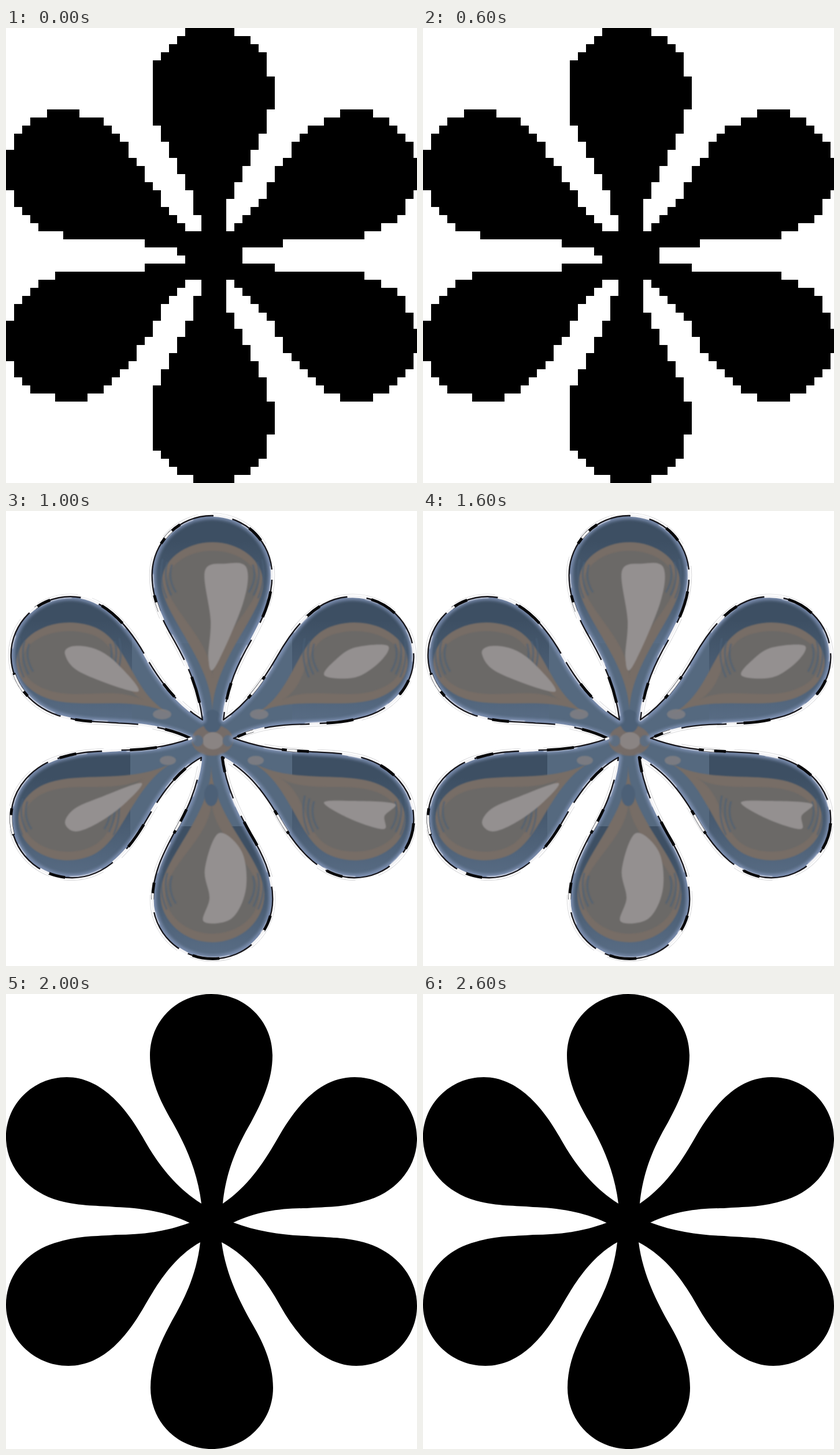
These frames come from a looping animation (711 by 788 pixels, 3 s). An HTML page:

```html
<!DOCTYPE html>
<html lang="en">
<head>
<meta charset="utf-8">
<title>Flower</title>
<style>
  html, body { margin: 0; width: 100%; height: 100%; overflow: hidden; background: #fff; }
  svg { display: block; width: 711px; height: 788px; }
  .look { visibility: hidden; animation: show 3s step-end infinite; }
  .glass { animation-delay: -2s; }
  .smooth { animation-delay: -1s; }
  .line { fill: none; stroke-linejoin: round; }
  .soft { filter: blur(1px); }
  @keyframes show {
    0% { visibility: visible; }
    33.3333%, 100% { visibility: hidden; }
  }
</style>
</head>
<body>
<svg viewBox="0 0 711 788">
  <defs>
    <path id="flower"/>
    <clipPath id="inside"><use href="#flower" transform="matrix(.98 0 0 .974 8.6 8)"/></clipPath>
    <linearGradient id="sky" x2="0" y2="1">
      <stop offset=".2" stop-color="#3d4f63"/>
      <stop offset="1" stop-color="#586c84"/>
    </linearGradient>
  </defs>

  <path id="blocks" class="look" shape-rendering="crispEdges"/>

  <g class="look glass">
    <g transform="matrix(.98 0 0 .974 8.6 8)">
      <use class="line" href="#flower" stroke="#d9d9db" stroke-width="10" stroke-dasharray="70 25 110 40"/>
      <use class="line" href="#flower" stroke="#fff" stroke-width="8"/>
    </g>
    <g clip-path="url(#inside)">
      <g id="body"></g>
      <g transform="matrix(.98 0 0 .974 8.6 8)">
        <use class="line" href="#flower" stroke="#8799bd" stroke-width="13" opacity=".75" style="filter: blur(2.5px)"/>
        <use class="line soft" href="#flower" stroke="#dfe4f2" stroke-width="5" stroke-dasharray="60 90 25 70"/>
      </g>
    </g>
    <g transform="matrix(.98 0 0 .974 8.6 8)">
      <use class="line" href="#flower" stroke="#17161b" stroke-width="2.4"/>
      <use class="line" href="#flower" stroke="#08080a" stroke-width="5" stroke-dasharray="48 130 30 95"/>
      <use class="line" href="#flower" stroke="#f4f4f6" stroke-width="4" stroke-dasharray="34 120 18 80" stroke-dashoffset="-62"/>
    </g>
  </g>

  <use class="look smooth" href="#flower"/>
</svg>
<script>
  const $ = id => document.getElementById(id);

  // Three petals from the left notch to the right one.
  const half = (neck, notch) => `M317 ${notch}
    C275 376 228 370 190 369 C160 366 130 368 92 358
    C38 343 0 300 0 248 C0 191 47 144 105 144
    C164 144 207 196 236 247 C260 290 289 332 338 ${neck}
    C331 304 308 258 288 222 C268 188 249 150 249 106
    C249 47 296 0 355 0 C414 0 461 47 461 106
    C461 150 443 186 424 222 C402 260 381 303 375 ${neck}
    C418 334 446 292 470 250 C500 197 541 144 603 144
    C663 144 711 192 711 250 C711 303 672 346 619 359
    C581 370 558 368 520 371 C476 371 436 376 393 ${notch}`;
  const turn = d => d.replace(/(\d+) (\d+)/g, (_, x, y) => `${711 - x} ${788 - y}`).replace('M', 'L');
  const outline = half(363, 396) + turn(half(358, 392)) + 'Z';
  $('flower').setAttribute('d', outline);

  // Coarse blocks: a cell is filled when its middle lies in the outline.
  const ctx = document.createElement('canvas').getContext('2d');
  const area = new Path2D(outline);
  const cw = 14.1, ch = 788 / 56;
  let cells = '';
  for (let row = 0; row < 56; row++) {
    const y = row * ch, top = Math.round(y), bottom = Math.round(y + ch);
    for (let col = 0; col < 51; col++) {
      const x = col * cw, left = Math.round(x), right = Math.round(x + cw);
      if (ctx.isPointInPath(area, Math.min(x + cw / 2, 708), y + ch / 2))
        cells += `M${left} ${top}H${right}V${bottom}H${left}Z`;
    }
  }
  $('blocks').setAttribute('d', cells);

  // Ellipse drawn out to a tip.
  function drop(cx, cy, rx, ry, tx, ty) {
    const len = Math.hypot(tx - cx, ty - cy);
    const ux = (tx - cx) / len, uy = (ty - cy) / len;
    const ax = cx - rx * uy, ay = cy + ry * ux;
    const bx = cx + rx * uy, by = cy - ry * ux;
    const kx = rx * ux * .75, ky = ry * uy * .75;
    const mx = tx + (cx - tx) * .4, my = ty + (cy - ty) * .4;
    return `M${tx} ${ty}C${mx} ${my} ${ax + kx} ${ay + ky} ${ax} ${ay}`
      + `A${rx} ${ry} 0 0 1 ${bx} ${by}C${bx + kx} ${by + ky} ${mx} ${my} ${tx} ${ty}Z`;
  }

  // Smooth closed curve through a few points.
  function blob(pts) {
    const n = pts.length, at = i => pts[(i + n) % n];
    let d = 'M' + pts[0];
    for (let i = 0; i < n; i++) {
      const [a, b, c, e] = [at(i - 1), at(i), at(i + 1), at(i + 2)];
      const lead = b.map((s, k) => s + (c[k] - a[k]) / 6);
      const tail = c.map((s, k) => s - (e[k] - b[k]) / 6);
      d += `C${lead} ${tail} ${c}`;
    }
    return d + 'Z';
  }

  const petals = [
    { x: 357, y: 125, rx: 88, ry: 71, tip: [357, 350],
      light: [[344, 104], [380, 91], [416, 98], [410, 160], [362, 270], [350, 255], [354, 190]] },
    { x: 110, y: 262, rx: 92, ry: 69, tip: [285, 352],
      light: [[102, 248], [116, 234], [155, 239], [192, 264], [228, 313], [130, 280]] },
    { x: 603, y: 262, rx: 92, ry: 69, tip: [430, 352],
      light: [[551, 285], [572, 256], [605, 236], [660, 233], [648, 260], [605, 288]] },
    { x: 107, y: 535, rx: 86, ry: 70, tip: [290, 435],
      light: [[102, 540], [118, 516], [160, 497], [234, 471], [204, 508], [158, 541], [120, 555]] },
    { x: 603, y: 535, rx: 88, ry: 70, tip: [425, 435],
      light: [[550, 505], [600, 502], [672, 507], [655, 528], [653, 551], [595, 533]] },
    { x: 357, y: 664, rx: 90, ry: 83, tip: [355, 440],
      light: [[368, 558], [408, 590], [415, 655], [390, 706], [342, 711], [352, 670], [344, 620]] }
  ];

  const fill = (d, color) => `<path class="soft" d="${d}" fill="${color}"/>`;
  const spot = (x, y, rx, ry, color, o = 1) =>
    `<ellipse class="soft" cx="${x}" cy="${y}" rx="${rx}" ry="${ry}" fill="${color}" opacity="${o}"/>`;

  // Blue reflections along both sides of a petal head.
  function ripples(cx, cy) {
    let s = '';
    for (const side of [-1, 1]) for (let i = 0; i < 3; i++) {
      const x = cx + side * (86 - i * 8), h = 34 - i * 5;
      s += `<path class="line soft" d="M${x} ${cy - h}Q${x + side * 8} ${cy} ${x - side * 7} ${cy + h}" stroke="#4b6077" stroke-width="3" opacity=".65"/>`;
    }
    return s;
  }

  let art = '<rect width="711" height="788" fill="#55697f"/>';
  for (const { x, y } of petals)
    art += `<rect x="${x - 108}" y="${y - 118}" width="216" height="222" fill="url(#sky)"/>`;
  for (const { x, y, rx, ry, tip: [tx, ty], light } of petals) {
    art += fill(drop(x, y, rx, ry, tx, ty), '#776d66')
      + fill(drop(x, y, rx - 9, ry - 15, tx + (x - tx) * .27, ty + (y - ty) * .27), '#6b6967')
      + ripples(x, y - 8) + fill(blob(light), '#949090');
  }
  const warm = '#756c68', blue = '#4c6077', pale = '#8a8483';
  art += spot(357, 397, 36, 27, warm) + spot(357, 364, 16, 20, blue)
    + spot(355, 492, 12, 19, blue) + spot(358, 398, 18, 15, pale);
  for (const side of [-1, 1])
    art += spot(358 + side * 26, 398, 9, 10, '#5d6d80')
      + spot(354 + side * 84, 352, 16, 9, pale, .7)
      + spot(356 + side * 76, 432, 14, 8, pale, .7);
  $('body').innerHTML = art;
</script>
</body>
</html>
```
